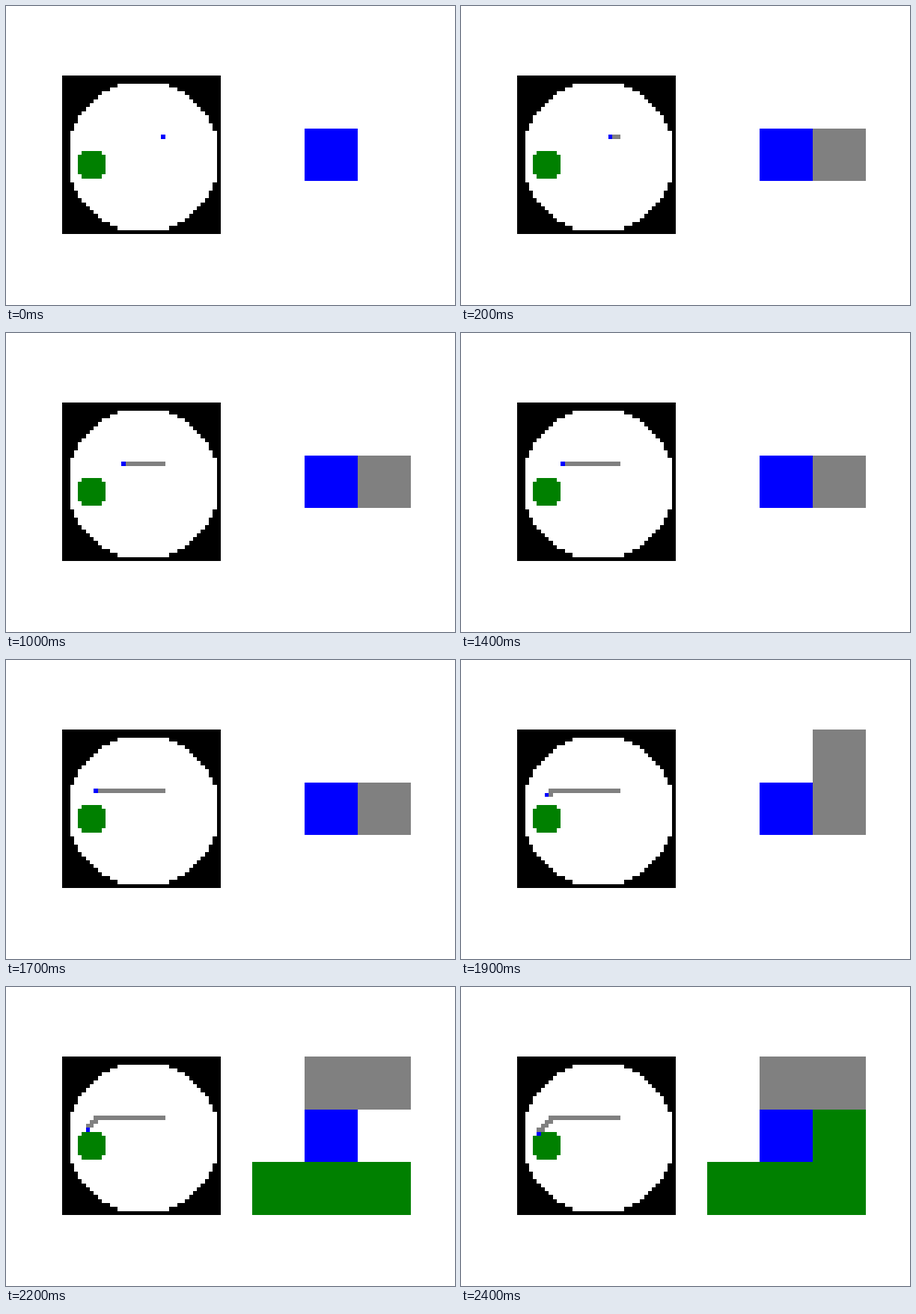
These frames come from a looping animation (600 px wide and 400 px high, 2500 ms). An HTML page with a canvas:

```html
<!DOCTYPE html>
<html lang="en">
<head>
<meta charset="utf-8">
<title>Grid walk</title>
<style>
html, body { margin: 0; width: 100%; height: 100%; overflow: hidden; background: #fff; }
canvas { display: block; }
</style>
</head>
<body>
<canvas id="stage" width="600" height="400"></canvas>
<script>
const ctx = document.getElementById('stage').getContext('2d');
const N = 40, SIZE = 212, LEFT = 75, TOP = 93;
const STEPS = 25, STEP_MS = 100, STRAIGHT = 17;
const WHITE = '#ffffff', BLACK = '#000000', GREEN = '#008000', GRAY = '#808080', BLUE = '#0000ff';
const VIEW_X = [329, 399, 470, 541], VIEW_Y = [93, 164, 234, 305];

// Cell edge snapped to whole pixels
const edge = k => Math.ceil(k * SIZE / N - 0.5);
const inDisk = (x, y, cx, cy, r) => (x - cx) ** 2 + (y - cy) ** 2 < r * r;

function rect(x0, y0, x1, y1, color) {
  ctx.fillStyle = color;
  ctx.fillRect(x0, y0, x1 - x0, y1 - y0);
}

// Straight left, then a staircase of down and left moves
function position(step) {
  const k = Math.max(0, step - STRAIGHT);
  return {
    x: 25 - Math.min(step, STRAIGHT) - Math.floor(k / 2),
    y: 15 + Math.ceil(k / 2)
  };
}

function ground(x, y) {
  if (inDisk(x, y, 7, 22, 4)) return GREEN;
  return inDisk(x, y, 20, 20, 19) ? WHITE : BLACK;
}

function buildGrid(step) {
  const grid = Array.from({ length: N }, (_, y) =>
    Array.from({ length: N }, (_, x) => ground(x, y)));
  for (let i = 0; i <= step; i++) {
    const p = position(i);
    grid[p.y][p.x] = i === step ? BLUE : GRAY;
  }
  return grid;
}

function draw(step) {
  const grid = buildGrid(step);
  const p = position(step);
  rect(0, 0, 600, 400, WHITE);
  for (let y = 0; y < N; y++) {
    for (let x = 0; x < N; x++) {
      rect(LEFT + edge(x), TOP + edge(y), LEFT + edge(x + 1), TOP + edge(y + 1), grid[y][x]);
    }
  }
  // Close-up of the walker and its eight neighbours
  for (let j = 0; j < 3; j++) {
    for (let i = 0; i < 3; i++) {
      rect(VIEW_X[i], VIEW_Y[j], VIEW_X[i + 1], VIEW_Y[j + 1], grid[p.y + j - 1][p.x + i - 1]);
    }
  }
}

const start = performance.now();
let shown = -1;

function tick() {
  const step = Math.floor((performance.now() - start) / STEP_MS) % STEPS;
  if (step !== shown) draw(shown = step);
  requestAnimationFrame(tick);
}
tick();
</script>
</body>
</html>
```
